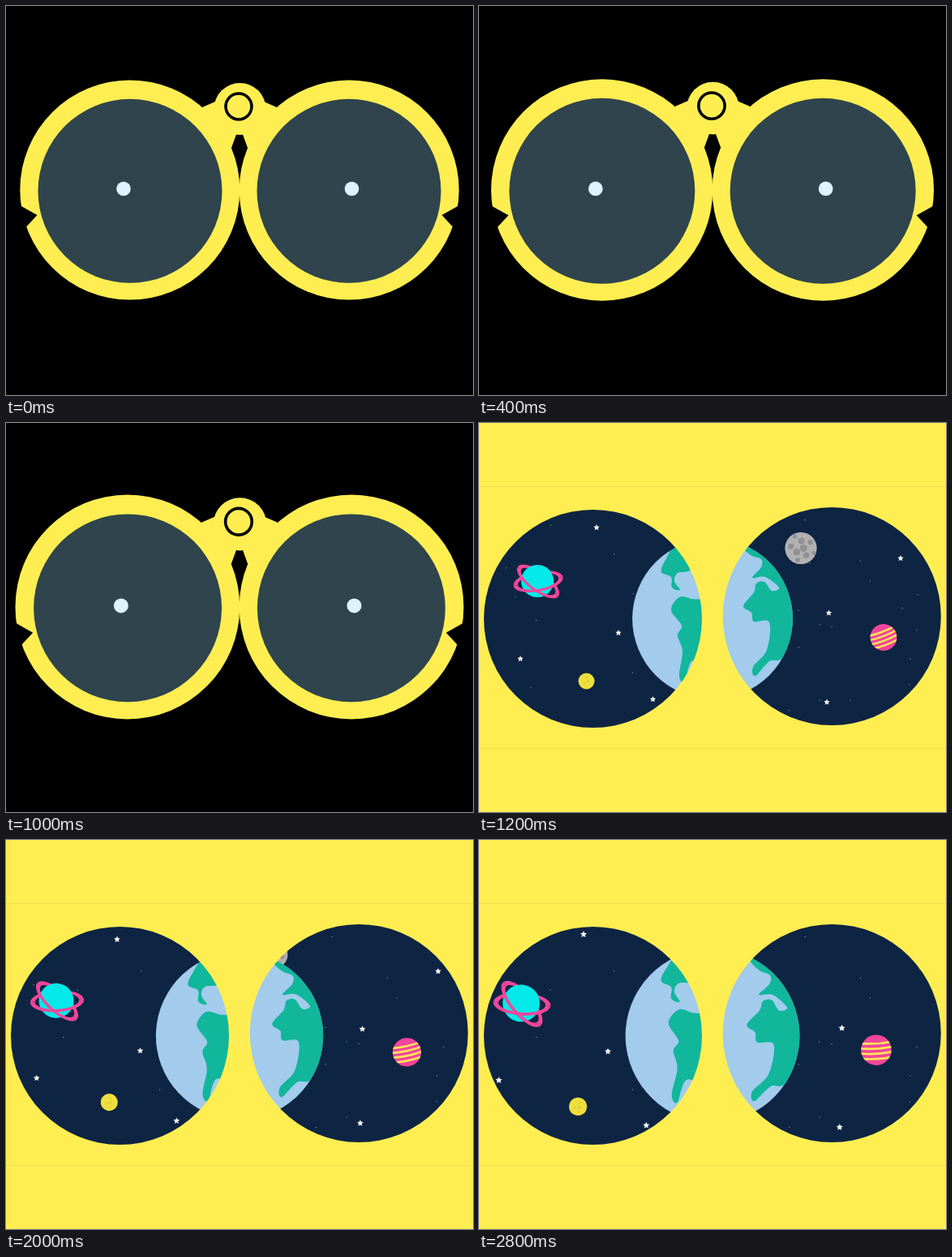
Recreate the animation shown at these times as an HTML page with a canvas. Size 576x480 px, loop 3 s.

```html
<!DOCTYPE html>
<html>
<head>
<meta charset="utf-8">
<style>
  html, body { margin: 0; width: 100%; height: 100%; overflow: hidden; background: #000; }
  canvas { display: block; }
</style>
</head>
<body>
<canvas id="stage" width="576" height="480"></canvas>
<script>
const ctx = document.getElementById('stage').getContext('2d');
const WIDTH = 576, HEIGHT = 480, MIDDLE = 288;
const TAU = Math.PI * 2, DEG = Math.PI / 180;
const YELLOW = '#feee52', NAVY = '#0e2443', SEA = '#a2cbec', LAND = '#11b69b', PINK = '#f2469a';

function disc(x, y, r, color) {
  ctx.fillStyle = color;
  ctx.beginPath();
  ctx.arc(x, y, r, 0, TAU);
  ctx.fill();
}

function polygon(points, color) {
  ctx.fillStyle = color;
  ctx.beginPath();
  points.forEach(p => ctx.lineTo(...p));
  ctx.fill();
}

// Smooth closed curve passing through its key points.
function blob(points, color) {
  const n = points.length, at = i => points[(i + n) % n];
  const handle = (i, sign) => [0, 1].map(k => at(i)[k] + sign * (at(i + 1)[k] - at(i - 1)[k]) / 6);
  ctx.fillStyle = color;
  ctx.beginPath();
  ctx.moveTo(...at(0));
  for (let i = 0; i < n; i++) {
    ctx.bezierCurveTo(...handle(i, 1), ...handle(i + 1, -1), ...at(i + 1));
  }
  ctx.fill();
}

function group(x, y, angle, scale, draw) {
  ctx.save();
  ctx.translate(x, y);
  ctx.rotate(angle * DEG);
  ctx.scale(scale, scale);
  draw();
  ctx.restore();
}

function clipDisc(r) {
  ctx.beginPath();
  ctx.arc(0, 0, r, 0, TAU);
  ctx.clip();
}

function fillStage(color) {
  ctx.fillStyle = color;
  ctx.fillRect(0, 0, WIDTH, HEIGHT);
}

// One half of the binoculars, relative to the hinge axis.
function barrel() {
  disc(-135.2, 0, 135.5, YELLOW);
  polygon([[1, -109], [-30, -109], [-46, -102], [-32, -62], [-10, -52], [-4, -68.5], [1, -68.5]], YELLOW);
  polygon([[-278, 15], [-249.5, 31], [-270, 53]], '#000');
  disc(-135, 1.3, 113.5, '#2f444d');
}

function binoculars(step) {
  fillStage('#000');
  group(MIDDLE, 227, 0, 1 + 0.0043 * step, () => {
    barrel();
    ctx.scale(-1, 1);
    barrel();
    ctx.scale(-1, 1);
    disc(0.5, -100, 32, YELLOW);
    disc(-1, -103, 17.8, '#000');
    disc(-1, -103, 14.2, YELLOW);
    disc(-143, -1.5, 8.8, '#def2ff');
    disc(138.5, -1.5, 8.8, '#def2ff');
  });
}

function star(x, y, r) {
  polygon(Array.from({ length: 10 }, (_, i) => {
    const a = i * TAU / 10 - TAU / 4, d = i % 2 ? r * 0.48 : r;
    return [x + d * Math.cos(a), y + d * Math.sin(a)];
  }), '#f4f8ff');
}

// Faint dots stay still, and some vanish; the stars fly outwards from a centre.
function sky(step, stars, centerY) {
  let seed = 7;
  const random = () => (seed = seed * 16807 % 2147483647) / 2147483647;
  ctx.globalAlpha = 0.5;
  for (let i = 0; i < 44; i++) {
    const x = random() * WIDTH, y = 105 + random() * 270;
    if (i < 30 || step < 2) disc(x, y, 0.75, '#dce8f4');
  }
  ctx.globalAlpha = 1;
  const zoom = 1 + 0.014 * step;
  stars.forEach(([x, y]) => star(
    MIDDLE + (x - MIDDLE) * zoom, centerY + (y - centerY) * zoom, 3.9 + 0.05 * step));
}

const westStars = [[145, 129], [172, 259], [51, 291], [214.5, 341]];
const eastStars = [[520, 167], [431.5, 234.5], [429, 344.5]];

// Key points of the coasts.
const northWest = [[246, 148], [230, 169], [225, 184], [237, 190], [238, 203], [248, 206],
  [241, 195], [245, 185], [260, 182], [275, 165]];
const southWest = [[247, 215], [262, 217], [285, 226], [285, 291], [262, 294], [254, 320],
  [247, 312], [251, 282], [245, 262], [250, 250], [237, 231]];
const east = [[326, 151], [335, 163], [348, 168], [348, 178], [337, 191], [353, 190], [370, 203],
  [361, 207], [352, 196], [342, 198], [339, 209], [326, 226], [336, 234], [339, 245], [358, 246],
  [355, 280], [338, 301], [341, 312], [358, 294], [377, 286], [400, 220], [370, 150]];

function earth(step, lands) {
  group(MIDDLE, 241.5, 0.55 * step, 1 + 0.0107 * step, () => {
    clipDisc(98.9);
    ctx.translate(-MIDDLE, -241.5);
    fillStage(SEA);
    lands.forEach(points => blob(points, LAND));
  });
}

// Half of a flat ring, wide at its ends and narrow across the planet.
function halfRing(tilt, from) {
  ctx.fillStyle = PINK;
  ctx.beginPath();
  ctx.ellipse(1, 0.5, 31, 12.5, tilt * DEG, from, from + Math.PI);
  ctx.ellipse(1, 0.5, 25.5, 9.3, tilt * DEG, from + Math.PI, from, true);
  ctx.fill();
}

function ringedPlanet(step) {
  group(72 - 2.5 * step, 195 + 0.8 * step, 1.7 * step, 1 + 0.018 * step, () => {
    [36, -10].forEach(tilt => halfRing(tilt, Math.PI));
    disc(0, 0, 20, '#04e9e9');
    [36, -10].forEach(tilt => halfRing(tilt, 0));
  });
}

function craters(count, radius, size, color) {
  for (let i = 0; i < count; i++) {
    const a = i * 2.4, d = radius * Math.sqrt((i + 0.3) / count);
    disc(d * Math.cos(a), d * Math.sin(a), size * (1 - 0.5 * i / count), color);
  }
}

function yellowPlanet(step) {
  group(132.5 - 1.3 * step, 318.5 + 1.3 * step, 3 * step, 1 + 0.014 * step, () => {
    disc(0, 0, 10, '#efdf3c');
    craters(4, 6, 1.8, '#e3d138');
  });
}

function moon(step) {
  const x = 397 - 16 * step - 0.1 * step * step;
  const y = 154.5 - 7 * step + 0.95 * step * step;
  group(x, y, -10 * step, 1 - 0.045 * step, () => {
    clipDisc(19.7);
    disc(0, 0, 20, '#b1b1b2');
    craters(9, 18, 4.5, '#919193');
  });
}

function stripedPlanet(step) {
  group(499 - 1.13 * step, 264.5 - 0.67 * step, -20 + 2.2 * step, 1 + 0.018 * step, () => {
    clipDisc(16.4);
    disc(0, 0, 17, PINK);
    ctx.strokeStyle = '#ffe65a';
    ctx.lineWidth = 2.4;
    for (let y = -8; y < 12; y += 5.5) {
      ctx.beginPath();
      ctx.moveTo(-18, y);
      ctx.quadraticCurveTo(0, y + 2.5, 18, y - 0.5);
      ctx.stroke();
    }
  });
}

// Paints one half of the stage, then covers all but a round window.
function lens(left, x, y, draw) {
  ctx.save();
  ctx.beginPath();
  ctx.rect(left, 0, MIDDLE, HEIGHT);
  ctx.clip();
  fillStage(NAVY);
  draw();
  ctx.fillStyle = YELLOW;
  ctx.beginPath();
  ctx.rect(0, 0, WIDTH, HEIGHT);
  ctx.arc(x, y, 134.5, 0, TAU);
  ctx.fill('evenodd');
  ctx.restore();
}

function space(step) {
  lens(0, 140.5, 241.5, () => {
    sky(step, westStars, 241.5);
    ringedPlanet(step);
    yellowPlanet(step);
    earth(step, [northWest, southWest]);
  });
  lens(MIDDLE, 435.3, 238.5, () => {
    sky(step, eastStars, 256);
    moon(step);
    stripedPlanet(step);
    earth(step, [east]);
  });
  ctx.fillStyle = '#f0e050';
  [78, 401].forEach(y => ctx.fillRect(0, y, WIDTH, 1));
}

function render() {
  const step = Math.floor(performance.now() % 3000 / 200);
  if (step < 6) binoculars(step);
  else space(step - 6);
  requestAnimationFrame(render);
}
render();
</script>
</body>
</html>
```
